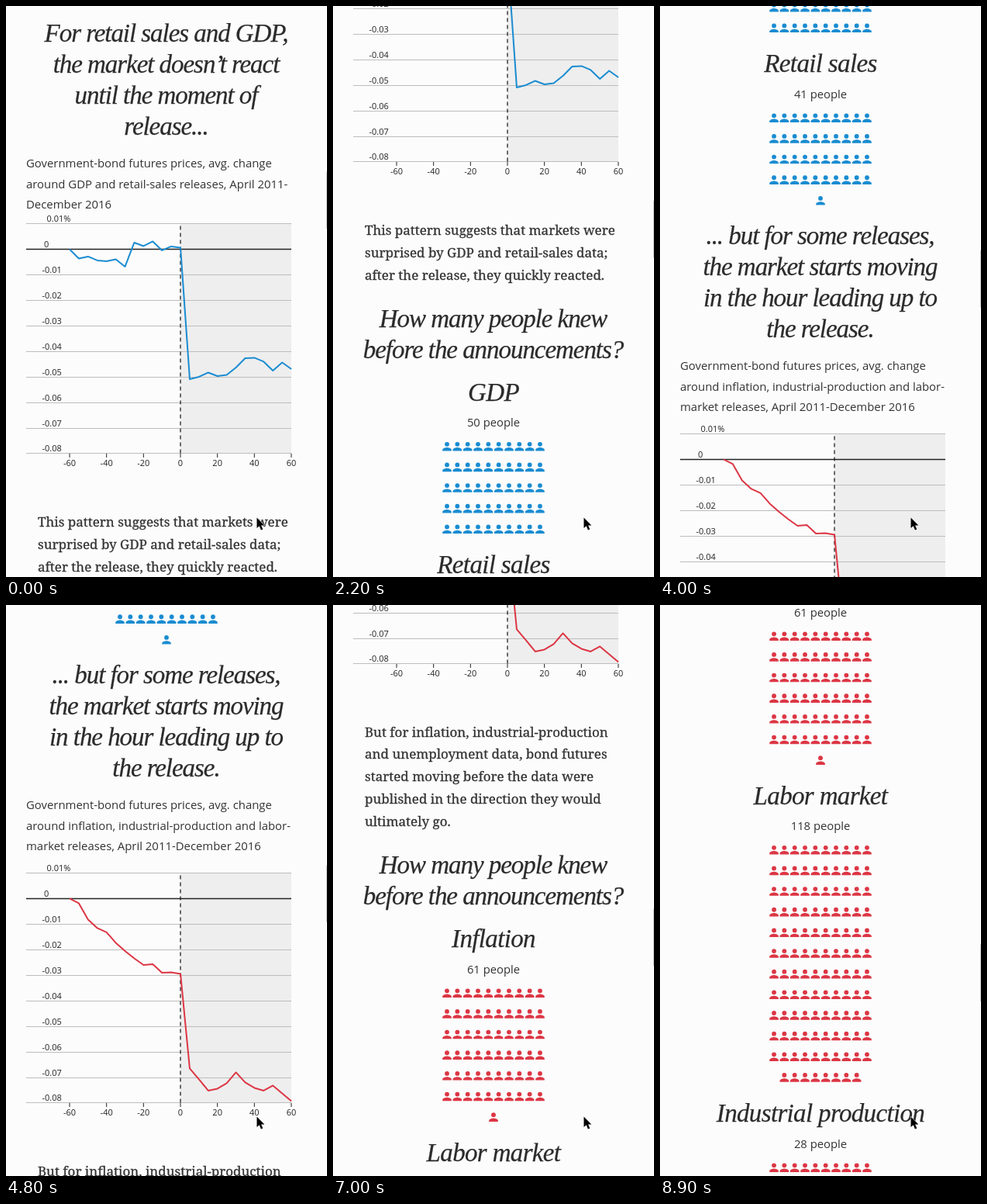
Write an HTML page that moves like this. It is 414x736 px and loops after 9.9 s.

```html
<!DOCTYPE html>
<html lang="en">
<head>
<meta charset="utf-8">
<title>Market reaction scroll</title>
<style>
  html, body { margin: 0; width: 100%; height: 100%; overflow: hidden; background: #fcfcfc; }
  svg { display: block; width: 100vw; height: 100vh; }
  text { fill: #333; }
  .head { font: italic 33px "Liberation Serif", serif; letter-spacing: -1.05px; text-anchor: middle;
    fill: #2b2b2b; stroke: #2b2b2b; stroke-width: .25px; }
  .sub { letter-spacing: -.65px; }
  .note { font: 14.9px "Open Sans", sans-serif; }
  .count { font: 14.8px "Open Sans", sans-serif; text-anchor: middle; }
  .body { font: 17px "Noto Serif", serif; stroke: #333; stroke-width: .3px; }
  .tick { font: 11px "Open Sans", sans-serif; fill: #222; }
  .mid { text-anchor: middle; }
  .grid { stroke: #bdbdbd; }
  .zero { stroke: #222; stroke-width: 1.5; }
  .mark { stroke: #222; }
  .now { stroke: #111; stroke-width: 1.2; stroke-dasharray: 5 4; }
  .series { fill: none; stroke-width: 2; stroke-linejoin: round; }
</style>
</head>
<body>
<svg viewBox="0 0 414 736">
  <defs>
    <g id="person">
      <circle cy="-2.9" r="2.9"/>
      <path d="M-5.8 5.8V4.3C-5.8 2.4-1.9 1.4 0 1.4S5.8 2.4 5.8 4.3V5.8Z"/>
    </g>
  </defs>
  <g id="page"></g>
  <rect id="thumb" x="413" width="1" height="73.5" fill="#c2c2c2"/>
  <path d="M0 0V13.6L3.2 10.7 5.4 15.9 7.8 14.9 5.6 9.9H9.9Z" transform="translate(323.5 659.5)"
        fill="#000" stroke="#fff" stroke-width="1" paint-order="stroke"/>
</svg>
<script>
const NS = "http://www.w3.org/2000/svg";
const BLUE = "#1a8cd1", RED = "#dc3644";
const page = document.getElementById("page");
const thumb = document.getElementById("thumb");

function add(tag, attrs, content) {
  const el = document.createElementNS(NS, tag);
  for (const key in attrs) el.setAttribute(key, attrs[key]);
  if (content) el.textContent = content;
  page.appendChild(el);
}

function lines(cls, x, y, pitch, rows) {
  rows.forEach((row, i) => add("text", { class: cls, x, y: y + i * pitch }, row));
}

const heading = (y, rows) => lines("head", 206.5, y, 40, rows);
const note = (y, rows) => lines("note", 26, y, 26.6, rows);
const para = (y, rows) => lines("body", 41, y, 28.75, rows);
const line = (cls, x1, y1, x2, y2) => add("line", { class: cls, x1, y1, x2, y2 });

// values: pixels below the zero line, one per five minutes
function chart(top, color, values) {
  const step = 32.94, bottom = top + 9 * step;
  add("rect", { x: 225, y: top, width: 143, height: bottom - top, fill: "#eee" });
  for (let i = 0; i < 10; i++) {
    const y = Math.round(top + i * step - .5) + .5;
    line(i === 1 ? "zero" : "grid", 26, y, 368, y);
    const label = i === 0 ? "0.01%" : i === 1 ? "0" : "-0.0" + (i - 1);
    add("text", { class: "tick", x: i === 0 ? 52.5 : i === 1 ? 49 : 46.5, y: y - 2.5 }, label);
  }
  for (let m = -60; m <= 60; m += 20) {
    const x = 225 + m * 2.383;
    line("mark", x, bottom, x, bottom + 5);
    add("text", { class: "tick mid", x, y: bottom + 16.5 }, String(m));
  }
  line("now", 225, top + 3, 225, bottom);
  const points = values.map((v, i) => `${82 + i * 11.92},${top + step + v}`).join(" ");
  add("polyline", { class: "series", points, stroke: color });
}

function crowd(y, title, total, color) {
  add("text", { class: "head sub", x: 207, y }, title);
  add("text", { class: "count", x: 207, y: y + 33.5 }, total + " people");
  for (let i = 0; i < total; i++) {
    const row = Math.floor(i / 10);
    const width = Math.min(10, total - row * 10);
    const x = 207 + (i % 10 - (width - 1) / 2) * 13.33;
    add("use", { href: "#person", x, y: y + 59.2 + row * 26.65, fill: color });
  }
}

heading(46, ["For retail sales and GDP,", "the market doesn’t react", "until the moment of", "release..."]);
note(208, ["Government-bond futures prices, avg. change",
  "around GDP and retail-sales releases, April 2011-", "December 2016"]);
chart(280.5, BLUE, [0, 12, 9.5, 14.5, 15.5, 13, 22.5, -8.5, -4, -10, 1.5, -3.5, -2,
  167.5, 164.5, 159, 163.5, 162, 152.5, 140.5, 140, 145, 156.5, 146, 154.5]);
para(671, ["This pattern suggests that markets were",
  "surprised by GDP and retail-sales data;", "after the release, they quickly reacted."]);
heading(790, ["How many people knew", "before the announcements?"]);
crowd(884.5, "GDP", 50, BLUE);
crowd(1107, "Retail sales", 41, BLUE);

heading(1329, ["... but for some releases,", "the market starts moving", "in the hour leading up to", "the release."]);
note(1491, ["Government-bond futures prices, avg. change",
  "around inflation, industrial-production and labor-", "market releases, April 2011-December 2016"]);
chart(1573.5, RED, [0, 6, 27, 38, 43.5, 57, 67.5, 77, 85.5, 84.5, 95.5, 95, 97,
  219, 233, 247.5, 245, 238, 224, 237, 244, 247.5, 241, 251, 261]);
para(1963.5, ["But for inflation, industrial-production", "and unemployment data, bond futures",
  "started moving before the data were", "published in the direction they would", "ultimately go."]);
heading(2140, ["How many people knew", "before the announcements?"]);
crowd(2235, "Inflation", 61, RED);
crowd(2510.5, "Labor market", 118, RED);
crowd(2920, "Industrial production", 28, RED);

// [time in ms, scroll offset]
const LOOP = 9900;
const path = [[0, 0], [1000, 50], [1500, 110], [1600, 160], [2200, 376], [3000, 558], [3600, 735],
  [4000, 1022], [4800, 1228], [5400, 1268], [6200, 1451], [7200, 1880], [7800, 2007],
  [8400, 2200], [8900, 2254]];

// The page advances in held steps
function hold(t) {
  if (t < 1000) return 0;
  if (t < 1500) return 1000;
  if (t < 1600) return 1500;
  if (t >= 8900) return 8900;
  return Math.min(8400, 1600 + Math.floor((t - 1600) / 200) * 200);
}

function scrollAt(t) {
  const i = path.findIndex(p => p[0] >= t);
  if (i === 0) return 0;
  const [t0, y0] = path[i - 1], [t1, y1] = path[i];
  return Math.round(y0 + (y1 - y0) * (t - t0) / (t1 - t0));
}

function draw() {
  const y = scrollAt(hold(performance.now() % LOOP));
  page.setAttribute("transform", `translate(0 ${-y})`);
  thumb.setAttribute("y", 213.5 + y * .0993);
  requestAnimationFrame(draw);
}
draw();
</script>
</body>
</html>
```
